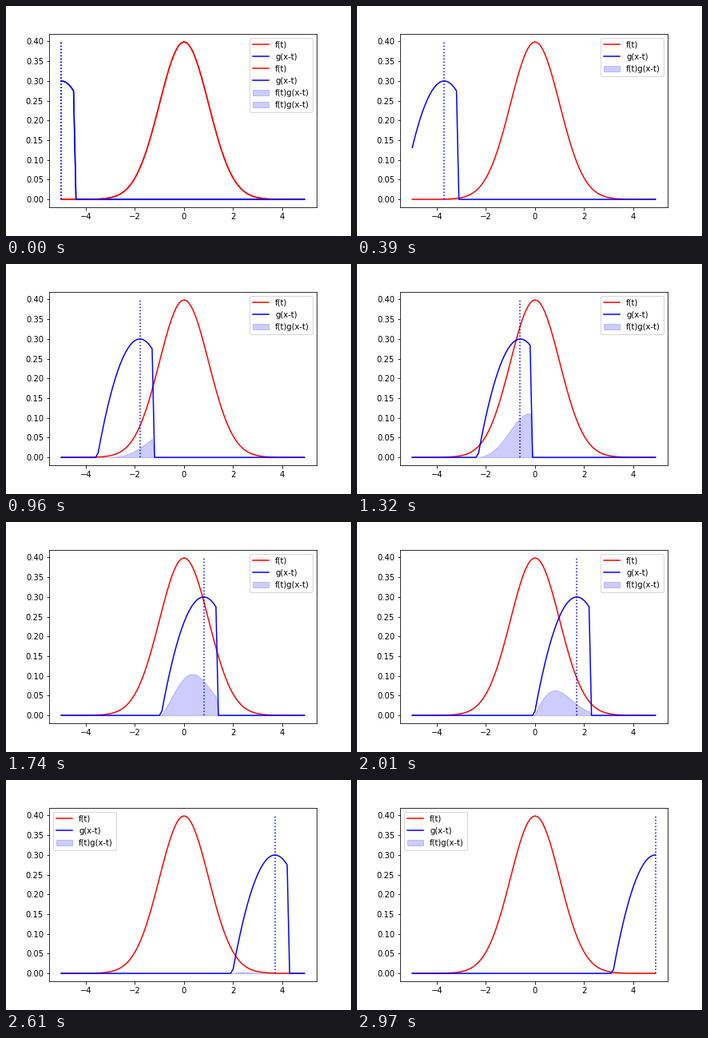
Animation, 432 px wide and 288 px high, one loop 3070 ms. Source, as a matplotlib script:

```python
import numpy as np
import matplotlib.pyplot as plt
from matplotlib.animation import FuncAnimation

STEPS = 100
TICK = 10            # ms per animation frame
TICKS_PER_STEP = 3   # each step lasts 30 ms
TOTAL = 307          # the last step is held for 100 ms

t = np.arange(-50, 50) * 0.1


def f(u):
    return np.exp(-u**2 / 2) / np.sqrt(2 * np.pi)


def g(u):
    return np.where(u >= -0.5, np.maximum(0.3 - 0.1 * u**2, 0), 0)


fig, ax = plt.subplots(figsize=(6, 4), dpi=72)
fig.subplots_adjust(left=0.125, right=0.9, bottom=0.125, top=0.88)


def add_curves():
    red, = ax.plot(t, f(t), "r", label="f(t)")
    blue, = ax.plot(t, g(t[0] - t), "b", label="g(x-t)")
    mark, = ax.plot([t[0], t[0]], [0, 0.4], "b:")
    area = ax.fill_between(t, 0, f(t) * g(t[0] - t), color="b", alpha=0.2,
                           label="f(t)g(x-t)")
    return red, blue, mark, area


main = add_curves()
extra = add_curves()  # the opening step is drawn twice
ax.set_xlim(-5.495, 5.395)
ax.set_ylim(-0.02, 0.42)


def update(i):
    k = min(i // TICKS_PER_STEP, STEPS - 1)
    x = t[k]
    gx = g(x - t)
    product = f(t) * gx
    outline = np.vstack([[t[0], 0], np.column_stack([t, product]),
                         [t[-1], 0], np.column_stack([t, 0 * t])[::-1]])
    for red, blue, mark, area in (main, extra):
        blue.set_ydata(gx)
        mark.set_xdata([x, x])
        area.set_verts([outline])
    for artist in extra:
        artist.set_visible(k == 0)

    groups = (main, extra) if k == 0 else (main,)
    handles = [h for grp in groups for h in grp[:2]]
    handles += [grp[3] for grp in groups]
    ax.legend(handles=handles, loc="best")
    return ()


anim = FuncAnimation(fig, update, frames=TOTAL, interval=TICK,
                     init_func=lambda: update(0), repeat=True, repeat_delay=0)
plt.show()
```
